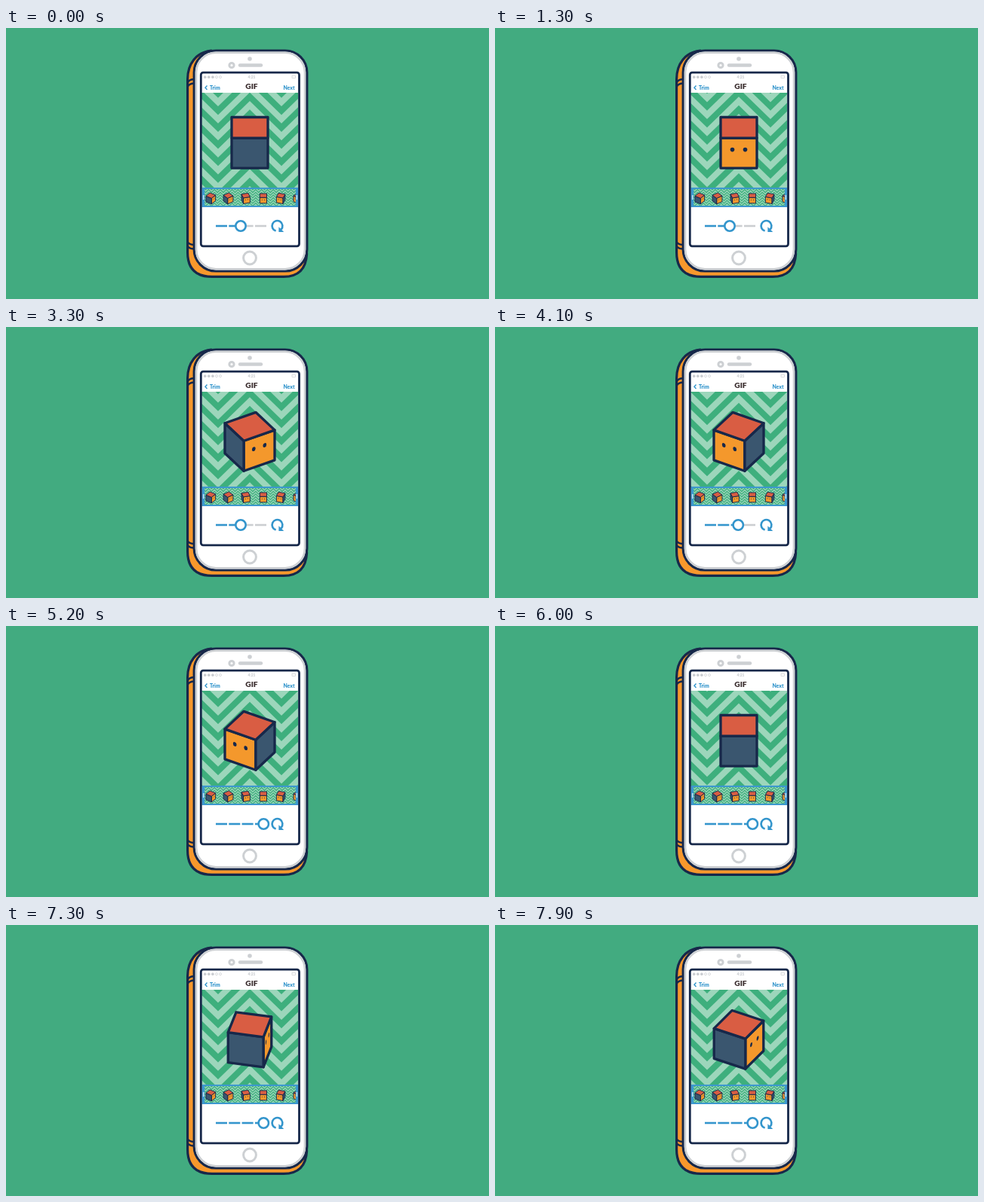
Animation of 640x360 px, one loop 8000 ms. Source, as an HTML page:

```html
<!DOCTYPE html>
<html lang="en">
<head>
<meta charset="utf-8">
<title>Phone with spinning cube</title>
<style>
  html, body { margin: 0; width: 100%; height: 100%; overflow: hidden; background: #42ab80; }
  svg { display: block; width: 100vw; height: 100vh; }
  text { font-family: Lato, "Open Sans", sans-serif; font-weight: 900; }
</style>
</head>
<body>
<svg viewBox="0 0 640 360">
  <defs>
    <clipPath id="pane"><rect x="259" y="86" width="128" height="127"/></clipPath>
    <clipPath id="strip"><rect x="260" y="213" width="127" height="24"/></clipPath>
  </defs>
  <rect width="640" height="360" fill="#42ab80"/>

  <!-- phone side and front -->
  <g stroke="#17284a" stroke-width="3.2">
    <path d="M272 30 C252 32 240.6 48 240.6 68 V298 Q240.6 330.4 273 330.4 H368 Q397 330.4 398.6 300 Z" fill="#f7982c" stroke-linejoin="round"/>
    <path d="M240.6 73 Q242 68.5 249 68 M240.6 78.5 Q242 74 249 73.5 M240.6 284 Q242 287.5 249 288 M240.6 289.5 Q242 293 249 293.5" fill="none" stroke-width="2.4"/>
    <rect x="249.2" y="30" width="149.6" height="293" rx="29" fill="#fff"/>
  </g>
  <g fill="none" stroke="#cdd0d3" stroke-width="2.6">
    <rect x="252" y="32.8" width="144" height="287.4" rx="26.3"/>
    <circle cx="299" cy="49.5" r="3.1" stroke-width="3"/>
    <path d="M310 49.5H338" stroke-width="4.4" stroke-linecap="round"/>
    <circle cx="323" cy="41" r="2.8" fill="#cdd0d3" stroke="none"/>
    <circle cx="323" cy="305.5" r="8.4" stroke-width="3"/>
  </g>

  <!-- status and title bars -->
  <rect x="258.3" y="59.2" width="130.2" height="230.6" rx="3" fill="#fff"/>
  <g fill="#c9ccd0" stroke="#c9ccd0" stroke-width=".7">
    <g id="signal"></g>
    <rect x="379" y="63.5" width="4.5" height="3" fill="none"/>
    <text x="325.5" y="67" font-size="5" text-anchor="middle" stroke="none">4:21</text>
  </g>
  <g fill="#3395cc" font-size="6.8">
    <path d="M266.5 76.5 L264 79.2 L266.5 82" fill="none" stroke="#3395cc" stroke-width="1.4"/>
    <text x="270" y="81.5">Trim</text>
    <text x="382.5" y="81.5" text-anchor="end">Next</text>
  </g>
  <text x="325.5" y="81.2" font-size="10.2" text-anchor="middle" fill="#392c2d">GIF</text>

  <!-- preview -->
  <g clip-path="url(#pane)">
    <rect x="259" y="86" width="128" height="127" fill="#3eaf7d"/>
    <g id="waves"></g>
    <g id="cube"></g>
  </g>

  <!-- film strip -->
  <g clip-path="url(#strip)">
    <rect x="259" y="212" width="129" height="26" fill="#3eaf7d"/>
    <g id="ripples"></g>
    <g id="thumbs"></g>
  </g>
  <rect x="260.5" y="213" width="126" height="24" fill="none" stroke="#3c98cf" stroke-width="2"/>
  <path d="M261.7 213V237 M385.3 213V237" stroke="#3c98cf" stroke-width="3"/>
  <path d="M261.7 222V228 M385.3 222V228" stroke="#fff" stroke-width="1"/>
  <rect x="258.3" y="59.2" width="130.2" height="230.6" rx="3" fill="none" stroke="#17284a" stroke-width="2.8"/>

  <!-- speed slider -->
  <g fill="none" stroke="#3395cc" stroke-width="2.6">
    <g id="track"></g>
    <circle id="knob" cy="263" r="6.7" fill="#fff"/>
    <path d="M357.6 269.6 A6.9 6.9 0 1 1 364.6 267.6"/>
    <path d="M361.4 264.2 V270.9 H368.2 Z" fill="#3395cc" stroke="none"/>
  </g>
</svg>
<script>
const $ = id => document.getElementById(id);
const LOOP = 8000, STEP = 100;
const NAVY = '#17284a', RED = '#d95d43', ORANGE = '#f4982c', SLATE = '#3a566f';
const SIDE = 48, TILT = 0.575, HEIGHT = 40;

// Heading of the cube's face in degrees over time
const spin = [[0, 90], [1300, -360], [3300, -1048.5], [3600, -1152],
  [4100, -1471.5], [5200, -2191.5], [6800, -3208.5], [7900, -3900], [8000, -3963]];

function headingAt(t) {
  const i = spin.findIndex(([end]) => t < end);
  const [t0, a0] = spin[i - 1], [t1, a1] = spin[i];
  return a0 + (a1 - a0) * (t - t0) / (t1 - t0);
}

// Cube seen from above, centred on the middle of its top face
function cubeMarkup(degrees, line) {
  const heading = degrees * Math.PI / 180, radius = SIDE / Math.SQRT2;
  const corner = a => [radius * Math.sin(a), radius * Math.cos(a) * TILT];
  const poly = (points, fill) =>
    `<path d="M${points.map(p => p.map(n => n.toFixed(2))).join('L')}Z" fill="${fill}"/>`;
  let out = '';
  for (let k = 0; k < 4; k++) {
    const a = heading + k * Math.PI / 2;
    if (Math.cos(a) < 0.001) continue;
    const l = corner(a - Math.PI / 4), r = corner(a + Math.PI / 4);
    const down = ([x, y]) => [x, y + HEIGHT];
    out += poly([l, r, down(r), down(l)], k ? SLATE : ORANGE);
    if (k) continue;
    const c = Math.cos(a), s = Math.sin(a);
    const m = [c, -s * TILT, 0, 1, s * SIDE / 2, c * TILT * SIDE / 2].map(n => n.toFixed(4));
    out += `<g transform="matrix(${m})" fill="${NAVY}" stroke="none">
      <circle cx="-8.5" cy="15.5" r="2.8"/><circle cx="8.5" cy="15.5" r="2.8"/></g>`;
  }
  out += poly([1, 3, 5, 7].map(n => corner(heading + n * Math.PI / 4)), RED);
  return `<g stroke="${NAVY}" stroke-width="${line}" stroke-linejoin="round">${out}</g>`;
}

// Stacked zigzag bands with a peak at x = 323
function zigzags(top, bottom, half, rise, period) {
  let d = '';
  const n = Math.ceil(66 / half);
  const first = top - period * Math.ceil(rise / period + 1);
  for (let y = first; y < bottom + period; y += period) {
    const upper = [], lower = [];
    for (let k = -n; k <= n; k++) {
      const py = y + (k % 2 ? rise : 0);
      upper.push([323 + k * half, py]);
      lower.unshift([323 + k * half, py + period / 2]);
    }
    d += `M${upper.concat(lower).join('L')}Z`;
  }
  return `<path d="${d}" fill="#9cd6bb"/>`;
}

const PERIOD = 22.6;
$('waves').innerHTML = zigzags(97, 214, 42, 41, PERIOD);
$('ripples').innerHTML = zigzags(212, 238, 3.9, 3.8, 3.6);
$('thumbs').innerHTML = [55, 38, 16, 0, -18, -40].map((a, i) =>
  `<g transform="translate(${271.3 + i * 23.2} 222.6) scale(.19)">${cubeMarkup(a, 5)}</g>`).join('');
$('signal').innerHTML = [0, 1, 2, 3, 4].map(i =>
  `<circle cx="${263.7 + i * 5.1}" cy="65.2" r="1.5"${i > 2 ? ' fill="none"' : ''}/>`).join('');

function draw(t) {
  const heading = headingAt(t);
  $('cube').innerHTML = `<g transform="translate(323 132.3)">${cubeMarkup(heading, 3.3)}</g>`;
  const turn = (heading - 90) / 360;
  $('waves').setAttribute('transform', `translate(0 ${(turn - Math.floor(turn)) * PERIOD})`);

  const u = Math.min(1, Math.max(0, (t - 3600) / 1200));
  const x = 311 + 30.3 * (1 - Math.cos(Math.PI * u)) / 2;
  $('knob').setAttribute('cx', x);
  $('track').innerHTML = [278, 295.3, 312.6, 330].map(a => {
    const b = a + 15, mid = Math.min(b, Math.max(a, x));
    const rest = x > 341 ? mid : b;
    return `<path d="M${mid} 263H${rest}" stroke="#cbced1"/><path d="M${a} 263H${mid}"/>`;
  }).join('');
}

const start = performance.now();
function frame() {
  const t = Math.max(0, performance.now() - start) % LOOP;
  draw(Math.floor(t / STEP) * STEP);
  requestAnimationFrame(frame);
}
frame();
</script>
</body>
</html>
```
